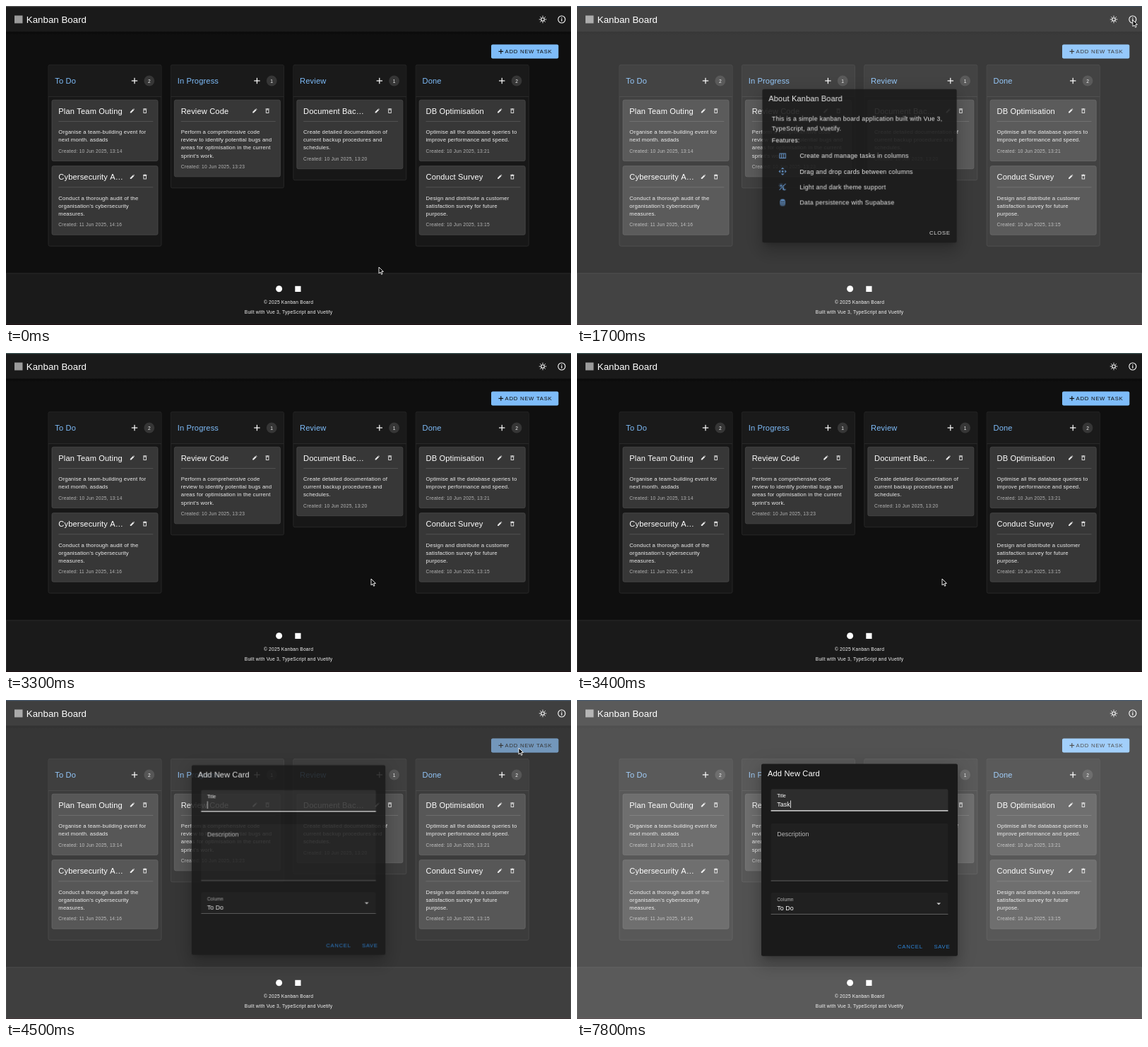
These frames come from a looping animation (800 px wide and 452 px high, 8 s). An HTML page with a canvas:

```html
<!DOCTYPE html>
<html lang="en">
<head>
<meta charset="utf-8">
<title>Kanban Board</title>
<style>
  html, body { margin: 0; width: 100%; height: 100%; overflow: hidden; background: #0f0f0f; }
  canvas { display: block; width: 800px; height: 452px; }
</style>
</head>
<body>
<canvas id="stage"></canvas>
<script>
const W = 800, H = 452, LOOP = 8000, STEP = 100;
const U = W / 1440;                       // interface pixels to stage pixels
const ABOUT_OPEN = 1580, ABOUT_CLOSE = 2880, FORM_OPEN = 4390;
const BLUE = '#7ebcf9', SURFACE = '#1a1a1a', LINE = '#2d2d2d';
const dpr = window.devicePixelRatio || 1;

function makeContext(canvas) {
  canvas.width = W * dpr;
  canvas.height = H * dpr;
  const context = canvas.getContext('2d');
  context.scale(dpr, dpr);
  return context;
}
const screen2d = makeContext(document.getElementById('stage'));
const layer = document.createElement('canvas');
const layer2d = makeContext(layer);
let g = screen2d;

const clamp = x => Math.min(1, Math.max(0, x));
const smooth = x => x * x * (3 - 2 * x);
const easeOut = x => 1 - (1 - x) ** 3;

// Text styles: size in interface pixels, letter spacing in em
const STYLE = {
  brand: [24, 0], title: [20, 0.0125], body: [16, 0.03125], field: [16, 0.0094],
  small: [14, 0.0178], button: [14, 0.0892], label: [12, 0.0094], caption: [12, 0.0333]
};

function text(str, x, midY, style, color = '#fff', align = 'left') {
  const [px, spacing] = STYLE[style], size = px * U;
  g.font = `${size}px "Liberation Sans", Arial, sans-serif`;
  g.letterSpacing = `${spacing * size}px`;
  g.textAlign = align;
  g.fillStyle = color;
  g.fillText(str, x, midY + size * 0.36);
}

function rect(x, y, w, h, color) {
  g.fillStyle = color;
  g.fillRect(x, y, w, h);
}

function box(x, y, w, h, r, fill, stroke) {
  g.beginPath();
  g.roundRect(x, y, w, h, r);
  g.fillStyle = fill;
  g.fill();
  if (stroke) {
    g.strokeStyle = stroke;
    g.lineWidth = 0.8;
    g.stroke();
  }
}

function disc(x, y, r, color) {
  g.beginPath();
  g.arc(x, y, r, 0, Math.PI * 2);
  g.fillStyle = color;
  g.fill();
}

function ring(x, y, r, color, width) {
  g.beginPath();
  g.arc(x, y, r, 0, Math.PI * 2);
  g.strokeStyle = color;
  g.lineWidth = width;
  g.stroke();
}

function poly(x, y, points, fill, stroke, width = 0.8) {
  g.beginPath();
  for (let i = 0; i < points.length; i += 2) g.lineTo(x + points[i], y + points[i + 1]);
  g.closePath();
  if (fill) { g.fillStyle = fill; g.fill(); }
  if (stroke) { g.strokeStyle = stroke; g.lineWidth = width; g.stroke(); }
}

function plus(x, y, r, color) {
  rect(x - r, y - 0.6, 2 * r, 1.2, color);
  rect(x - 0.6, y - r, 1.2, 2 * r, color);
}

function pencil(x, y) {
  poly(x, y, [-3, 3, -3, 1.5, 1, -2.5, 2.5, -1, -1.5, 3], '#e8e8e8');
  poly(x, y, [1.5, -3, 2.2, -3.4, 3.4, -2.2, 3, -1.5], '#e8e8e8');
}

function trash(x, y) {
  rect(x - 2.7, y - 3.1, 5.4, 0.9, '#e8e8e8');
  rect(x - 1.2, y - 3.5, 2.4, 0.6, '#e8e8e8');
  g.strokeStyle = '#e8e8e8';
  g.lineWidth = 0.9;
  g.strokeRect(x - 1.8, y - 1.6, 3.6, 4.5);
}

function rays(x, y, r1, r2, color, count = 8) {
  g.strokeStyle = color;
  g.lineWidth = 1;
  g.beginPath();
  for (let i = 0; i < count; i++) {
    const a = i * 2 * Math.PI / count;
    g.moveTo(x + r1 * Math.cos(a), y + r1 * Math.sin(a));
    g.lineTo(x + r2 * Math.cos(a), y + r2 * Math.sin(a));
  }
  g.stroke();
}

// Board
const columns = [
  { x: 60, name: 'To Do', cards: [
    ['Plan Team Outing', ['Organise a team-building event for', 'next month. asdads'], '10 Jun 2025, 13:14'],
    ['Cybersecurity A…', ['Conduct a thorough audit of the', 'organisation’s cybersecurity', 'measures.'], '11 Jun 2025, 14:16']] },
  { x: 233.4, name: 'In Progress', cards: [
    ['Review Code', ['Perform a comprehensive code', 'review to identify potential bugs and', 'areas for optimisation in the current', 'sprint’s work.'], '10 Jun 2025, 13:23']] },
  { x: 406.8, name: 'Review', cards: [
    ['Document Bac…', ['Create detailed documentation of', 'current backup procedures and', 'schedules.'], '10 Jun 2025, 13:20']] },
  { x: 580.2, name: 'Done', cards: [
    ['DB Optimisation', ['Optimise all the database queries to', 'improve performance and speed.'], '10 Jun 2025, 13:21'],
    ['Conduct Survey', ['Design and distribute a customer', 'satisfaction survey for future', 'purpose.'], '10 Jun 2025, 13:15']] }
];
const LEADING = 20 * U;
const cardHeight = card => 75.3 + LEADING * (card[1].length - 1);

function drawCard(x, y, card) {
  const [title, lines, date] = card;
  box(x + 5, y, 150, cardHeight(card), 2.2, '#373737', '#4a4a4a');
  text(title, x + 14.3, y + 15.4, 'title');
  pencil(x + 118.8, y + 15.4);
  trash(x + 136.7, y + 15.4);
  rect(x + 14.3, y + 29.8, 134, 0.7, '#5c5c5c');
  lines.forEach((line, i) => text(line, x + 14.3, y + 45.2 + i * LEADING, 'small', '#ececec'));
  text('Created: ' + date, x + 14.3, y + 60.9 + (lines.length - 1) * LEADING, 'caption', '#b4b4b4');
}

function drawColumn({ x, name, cards }) {
  const gap = 7.1, top = 83.4;
  const content = cards.reduce((sum, card) => sum + cardHeight(card) + gap, -gap);
  box(x, top, 160, 133.2 + content + 16 - top, 2.2, '#171717', LINE);
  box(x + 0.4, top + 0.4, 159.2, 44.6, [2.2, 2.2, 0, 0], SURFACE);
  rect(x, 128, 160, 0.8, LINE);
  text(name, x + 9.3, 106.2, 'title', BLUE);
  plus(x + 122, 106, 4.2, '#fff');
  disc(x + 142.8, 106, 7.4, '#363636');
  text(String(cards.length), x + 142.9, 106.2, 'caption', '#eee', 'center');
  let y = 133.2;
  for (const card of cards) {
    drawCard(x, y, card);
    y += cardHeight(card) + gap;
  }
}

function drawHeader(t, mouse) {
  rect(0, 0, W, 36.5, SURFACE);
  const shade = g.createLinearGradient(0, 36.5, 0, 41);
  shade.addColorStop(0, 'rgba(0,0,0,.35)');
  shade.addColorStop(1, 'rgba(0,0,0,0)');
  rect(0, 36.5, W, 4.5, shade);
  rect(12, 13.5, 11.5, 11, '#9a9a9a');
  text('Kanban Board', 28.8, 19, 'brand');

  ring(760, 19, 2.3, '#fff', 1.1);
  rays(760, 19, 3.4, 5.2, '#fff');
  if (t < 1700 && Math.hypot(mouse.x - 787, mouse.y - 19) < 13) {
    disc(787, 19, 13.4, `rgba(255,255,255,${t >= 1500 ? 0.27 : 0.1})`);
  }
  ring(786.8, 19, 5, '#fff', 1.1);
  rect(786.2, 18.2, 1.2, 3.5, '#fff');
  rect(786.2, 16.2, 1.2, 1.2, '#fff');
}

function drawAddButton(t, mouse) {
  box(687, 55.4, 95.3, 20, 2.2, 'rgba(0,0,0,.4)');
  box(687, 54.4, 95.3, 20, 2.2, BLUE);
  const over = mouse.x > 687 && mouse.x < 782 && mouse.y > 54 && mouse.y < 75;
  const dim = t >= 4300 && t < 4700 ? 0.3 : over ? 0.1 : 0;
  if (dim) box(687, 54.4, 95.3, 20, 2.2, `rgba(0,0,0,${dim})`);
  plus(700.8, 64.4, 3.3, '#111');
  text('ADD NEW TASK', 706.6, 64.5, 'button', '#111');
}

function drawFooter() {
  rect(0, 378.5, W, 72, SURFACE);
  g.strokeStyle = LINE;
  g.lineWidth = 0.8;
  g.strokeRect(0.4, 378.9, W - 0.8, 71.4);
  disc(386.6, 400.8, 4.5, '#fff');
  rect(409.3, 396.8, 8.2, 8.2, '#fff');
  text('© 2025 Kanban Board', 400, 420, 'caption', '#f2f2f2', 'center');
  text('Built with Vue 3, TypeScript and Vuetify', 400, 433.3, 'caption', '#f2f2f2', 'center');
  rect(0, 450.6, W, 1.4, '#1d1013');
}

function drawBoard(t, mouse) {
  rect(0, 0, W, H, '#0f0f0f');
  drawHeader(t, mouse);
  drawAddButton(t, mouse);
  columns.forEach(drawColumn);
  drawFooter();
}

// Dialogs
function drawSheet(y, h) {
  const x = 261, w = 278;
  for (const [dy, blur, spread, alpha] of [[11, 15, -7, 0.2], [24, 38, 3, 0.14], [9, 46, 8, 0.12]]) {
    const s = spread * U;
    g.save();
    g.shadowColor = `rgba(0,0,0,${alpha})`;
    g.shadowBlur = blur * U * dpr;
    // the caster sits off stage so only its shadow shows
    g.shadowOffsetX = 2 * W * dpr;
    g.shadowOffsetY = dy * U * dpr;
    box(x - s - 2 * W, y - s, w + 2 * s, h + 2 * s, 2.2, '#000');
    g.restore();
  }
  box(x, y, w, h, 2.2, SURFACE);
}

const ICON = '#6495cc';
const featureIcons = [
  (x, y) => {
    rect(x - 4.8, y - 3.8, 9.6, 7.6, ICON);
    for (const dx of [-3.7, -0.9, 1.9]) rect(x + dx, y - 2.6, 1.8, 5.2, SURFACE);
  },
  (x, y) => {
    for (const [dx, dy] of [[1, 0], [0, 1], [-1, 0], [0, -1]]) {
      const px = -dy, py = dx;
      poly(x, y, [5.6 * dx, 5.6 * dy, 3.2 * dx + 2.4 * px, 3.2 * dy + 2.4 * py,
                  3.2 * dx - 2.4 * px, 3.2 * dy - 2.4 * py], ICON);
    }
    rect(x - 1.3, y - 1.3, 2.6, 2.6, ICON);
  },
  (x, y) => {
    disc(x - 2.2, y - 2, 1.5, ICON);
    rays(x - 2.2, y - 2, 2.2, 3.1, ICON);
    poly(x, y, [-4.6, 4.4, 4.4, -4.6], null, ICON, 1);
    disc(x + 2.4, y + 2.4, 2.5, ICON);
    disc(x + 3.6, y + 1.4, 2, SURFACE);
  },
  (x, y) => {
    box(x - 4, y - 4.8, 8, 9.6, [4, 4, 3, 3], ICON);
    for (const dy of [-2.2, 0.2, 2.5]) {
      g.beginPath();
      g.ellipse(x, y + dy - 0.4, 4.2, 1.4, 0, 0, Math.PI);
      g.strokeStyle = SURFACE;
      g.lineWidth = 0.8;
      g.stroke();
    }
  }
];
const features = ['Create and manage tasks in columns', 'Drag and drop cards between columns',
  'Light and dark theme support', 'Data persistence with Supabase'];

function drawAbout() {
  drawSheet(116.8, 219.4);
  text('About Kanban Board', 270, 130.3, 'title');
  text('This is a simple kanban board application built with Vue 3,', 274.6, 159, 'body');
  text('TypeScript, and Vuetify.', 274.6, 172.3, 'body');
  text('Features:', 274.6, 190, 'body');
  features.forEach((label, i) => {
    const y = 212.2 + i * 40 * U;
    featureIcons[i](290, y);
    text(label, 314.4, y, 'body');
  });
  text('CLOSE', 500, 322.3, 'button', '#f4f4f4');
}

function drawField(y, h, fill, underline, weight) {
  box(274.6, y, 250.8, h, [2.2, 2.2, 0, 0], fill);
  rect(274.6, y + h - weight, 250.8, weight, underline);
}

const typing = [[6900, 'T'], [7400, 'Ta'], [7700, 'Tas'], [7800, 'Task']];

function drawForm(t) {
  drawSheet(90.5, 272.3);
  text('Add New Card', 270, 103.6, 'title');

  drawField(126.3, 31.2, '#2d2d2d', '#fff', 1.2);
  text('Title', 283.2, 135.4, 'label');
  const value = typing.reduce((now, [at, str]) => t >= at ? str : now, '');
  text(value, 283.2, 147.8, 'field');
  const caretOn = value || Math.floor((t - 4400) / 500) % 2 === 0;
  if (caretOn) rect(283.4 + g.measureText(value).width, 142.4, 0.8, 10.6, '#fff');

  drawField(175, 81.5, '#202020', '#6e6e6e', 0.8);
  text('Description', 283.2, 189.8, 'field', '#b8b8b8');

  drawField(273, 31, '#202020', '#6e6e6e', 0.8);
  text('Column', 283.2, 282.2, 'label', '#b8b8b8');
  text('To Do', 283.2, 294.3, 'field');
  poly(512.2, 288.8, [-2.9, -1.4, 2.9, -1.4, 0, 1.5], '#d0d0d0');

  text('CANCEL', 454, 348.7, 'button', '#2d83d6');
  text('SAVE', 505.4, 348.7, 'button', '#2d83d6');
}

function showDialog(draw, centerY, shown, scale, scrim) {
  screen2d.fillStyle = `rgba(255,255,255,${0.28 * scrim})`;
  screen2d.fillRect(0, 0, W, H);
  g = layer2d;
  g.clearRect(0, 0, W, H);
  draw();
  g = screen2d;
  g.save();
  g.globalAlpha = shown;
  g.translate(400, centerY);
  g.scale(scale, scale);
  g.drawImage(layer, -400, -centerY, W, H);
  g.restore();
}

function openDialog(draw, centerY, age, leaving = -1) {
  if (leaving >= 0) {
    const left = 1 - clamp(leaving / 125);
    showDialog(draw, centerY, left, 0.9 + 0.1 * left, 1 - smooth(clamp(leaving / 200)));
  } else {
    const shown = easeOut(clamp(age / 225));
    showDialog(draw, centerY, shown, 0.9 + 0.1 * shown, smooth(clamp(age / 200)));
  }
}

// Pointer path: time, x, y
const path = [
  [50, 528, 370], [200, 575, 300], [450, 700, 140], [600, 735, 100], [850, 735, 100],
  [1150, 765, 50], [1400, 787, 20], [1750, 787, 20], [2050, 690, 120], [2400, 548, 263],
  [2600, 522, 293], [2700, 517, 320], [3450, 517, 320], [3700, 585, 250], [4000, 690, 110],
  [4200, 726, 68], [4650, 726, 68], [4900, 600, 100], [5200, 410, 135], [5400, 351, 142]
];

function pointerAt(t) {
  const next = path.findIndex(p => p[0] > t);
  const [t1, x1, y1] = path[next < 0 ? path.length - 1 : next];
  const [t0, x0, y0] = next > 0 ? path[next - 1] : [t1 - 1, x1, y1];
  const k = clamp((t - t0) / (t1 - t0));
  return { x: x0 + (x1 - x0) * k, y: y0 + (y1 - y0) * k };
}

function drawPointer({ x, y }) {
  poly(x, y, [0, 0, 0, 9, 2.1, 7.1, 3.6, 10.3, 5, 9.7, 3.6, 6.5, 6.4, 6.4], '#000', '#fff', 0.9);
}

const topStrip = [[0, '#555'], [1600, '#41515f'], [2500, '#46604f'], [3000, '#425a5a'], [4400, '#475a70']];

function draw(t) {
  const mouse = pointerAt(t);
  drawBoard(t, mouse);
  if (t >= ABOUT_OPEN && t < ABOUT_CLOSE + 200) {
    openDialog(drawAbout, 226.5, t - ABOUT_OPEN, t - ABOUT_CLOSE);
  }
  if (t >= FORM_OPEN) openDialog(() => drawForm(t), 226.6, t - FORM_OPEN);
  rect(0, 0, W, 1.2, topStrip.reduce((now, [at, color]) => t >= at ? color : now, ''));
  if (t < 6900) drawPointer(mouse);
}

function tick() {
  const t = performance.now() % LOOP;
  draw(Math.floor(t / STEP) * STEP);
  requestAnimationFrame(tick);
}
tick();
</script>
</body>
</html>
```
